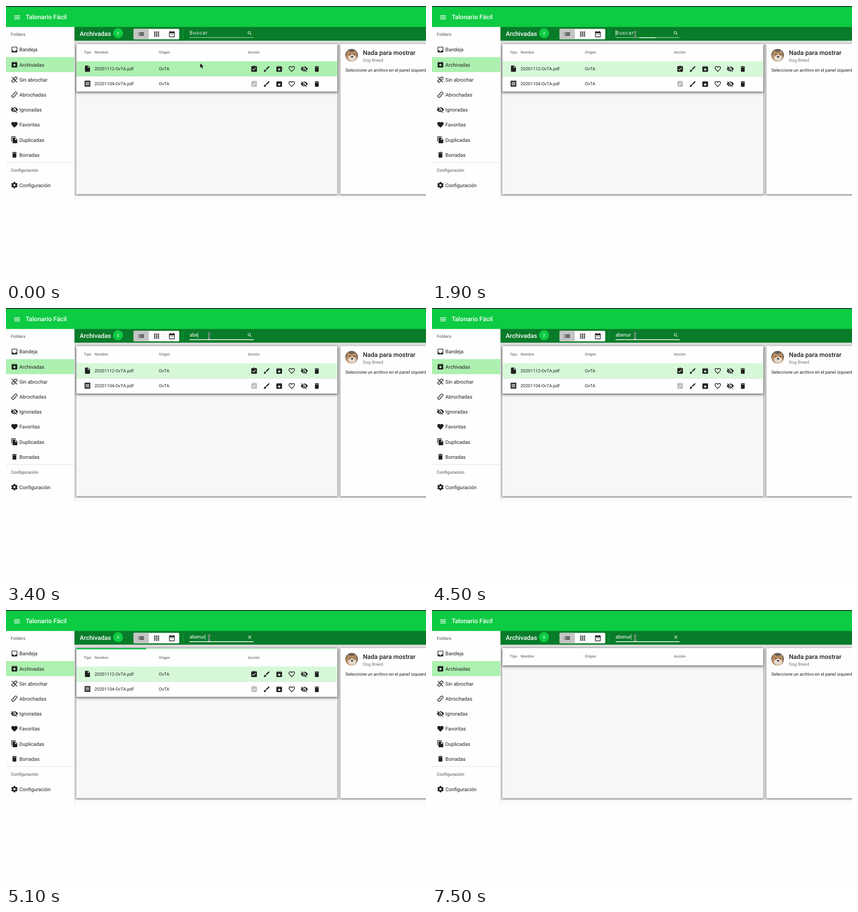
These frames come from a looping animation (926x605 px, 8000 ms). An HTML page:

```html
<!DOCTYPE html>
<html lang="es">
<head>
<meta charset="utf-8">
<title>Bandeja de archivos</title>
<style>
html, body { margin: 0; width: 100%; height: 100%; overflow: hidden; background: #fefefe; }
svg { display: block; width: 926px; height: 605px; font-family: Roboto, sans-serif; text-rendering: geometricPrecision; }
.raised { filter: drop-shadow(0 1px 2px rgba(0,0,0,.5)); }
.table { filter: drop-shadow(0 2px 2px rgba(0,0,0,.5)) drop-shadow(0 2px 3px rgba(0,0,0,.2)); }
</style>
</head>
<body>
<svg id="stage" viewBox="0 0 926 605"></svg>
<script>
const LOOP = 8000, UNIT = 0.692;
const GREEN = '#0dcb42', DARK = '#087c29', INK = '#1f1f1f', MUTED = '#757575', ACTIVE = '#adf0b0';
const stage = document.getElementById('stage');

const BOX = 'M20.5 5.2l-1.4-1.7C18.9 3.2 18.5 3 18 3H6c-.5 0-.9.2-1.2.5L3.5 5.2C3.2 5.6 3 6 3 6.5V19c0 1.1.9 2 2 2h14c1.1 0 2-.9 2-2V6.5c0-.5-.2-.9-.5-1.3z';
const LINK = 'M10 14a4 4 0 0 1 0-5.7l3.5-3.5a4 4 0 0 1 5.7 5.7l-1.5 1.5M14 10a4 4 0 0 1 0 5.7l-3.5 3.5a4 4 0 0 1-5.7-5.7l1.5-1.5';
const ICONS = {
  menu: 'M3 18h18v-2H3zM3 13h18v-2H3zM3 6v2h18V6z',
  inbox: 'M19 3H5c-1.1 0-2 .9-2 2v14c0 1.1.9 2 2 2h14c1.1 0 2-.9 2-2V5c0-1.1-.9-2-2-2zm0 12h-4c0 1.7-1.3 3-3 3s-3-1.3-3-3H5V5h14z',
  archive: BOX + 'M12 17.5L6.5 12H10v-2h4v2h3.5zM5.1 5l.8-1h12l1 1z',
  unarchive: BOX + 'M12 9.5l5.5 5.5H14v2h-4v-2H6.5zM5.1 5l.8-1h12l1 1z',
  hidden: 'M12 7c2.76 0 5 2.24 5 5 0 .65-.13 1.26-.36 1.83l2.92 2.92c1.51-1.26 2.7-2.89 3.43-4.75-1.73-4.39-6-7.5-11-7.5-1.4 0-2.74.25-3.98.7l2.16 2.16C10.74 7.13 11.35 7 12 7zM2 4.27l2.74 2.74C3.08 8.3 1.78 10.02 1 12c1.73 4.39 6 7.5 11 7.5 1.55 0 3.03-.3 4.38-.84L19.73 22 21 20.73 3.27 3zM7.53 9.8l1.55 1.55c-.05.21-.08.43-.08.65 0 1.66 1.34 3 3 3 .22 0 .44-.03.65-.08l1.55 1.55c-.67.33-1.41.53-2.2.53-2.76 0-5-2.24-5-5 0-.79.2-1.53.53-2.2zm4.31-.78l3.15 3.15.02-.16c0-1.66-1.34-3-3-3z',
  heart: 'M12 21.35l-1.45-1.32C5.4 15.36 2 12.28 2 8.5 2 5.42 4.42 3 7.5 3c1.74 0 3.41.81 4.5 2.09C13.09 3.81 14.76 3 16.5 3 19.58 3 22 5.42 22 8.5c0 3.78-3.4 6.86-8.55 11.54z',
  copies: 'M16 1H4c-1.1 0-2 .9-2 2v14h2V3h12zM15 5l6 6v10c0 1.1-.9 2-2 2H8c-1.1 0-2-.9-2-2V7c0-1.1.9-2 2-2zm-1 7h5.5L14 6.5z',
  trash: 'M6 19c0 1.1.9 2 2 2h8c1.1 0 2-.9 2-2V7H6zM19 4h-3.5l-1-1h-5l-1 1H5v2h14z',
  file: 'M6 2c-1.1 0-2 .9-2 2v16c0 1.1.9 2 2 2h12c1.1 0 2-.9 2-2V8l-6-6zm7 7V3.5L18.5 9z',
  receipt: 'M3 22l1.5-1.5L6 22l1.5-1.5L9 22l1.5-1.5L12 22l1.5-1.5L15 22l1.5-1.5L18 22l1.5-1.5L21 22V2l-1.5 1.5L18 2l-1.5 1.5L15 2l-1.5 1.5L12 2l-1.5 1.5L9 2 7.5 3.5 6 2 4.5 3.5 3 2zM18 17H6v-2h12zM18 13H6v-2h12zM18 9H6V7h12z',
  task: 'M19 3h-4.2C14.4 1.8 13.3 1 12 1s-2.4.8-2.8 2H5c-1.1 0-2 .9-2 2v14c0 1.1.9 2 2 2h14c1.1 0 2-.9 2-2V5c0-1.1-.9-2-2-2zm-7 0c.5 0 1 .5 1 1s-.5 1-1 1-1-.5-1-1 .5-1 1-1zm-2 14l-4-4 1.4-1.4 2.6 2.6 6.6-6.6L18 9z',
  brush: 'M7 14c-1.7 0-3 1.3-3 3 0 1.3-1.2 2-2 2 .9 1.2 2.5 2 4 2 2.2 0 4-1.8 4-4 0-1.7-1.3-3-3-3zM20.7 4.6l-1.3-1.3c-.4-.4-1-.4-1.4 0l-9 9L11.75 15l9-9c.4-.4.4-1 0-1.4z',
  list: 'M3 7h2v2H3zM3 11h2v2H3zM3 15h2v2H3zM7 7h14v2H7zM7 11h14v2H7zM7 15h14v2H7z',
  grid: [4, 10, 16].map(y => [4, 10, 16].map(x => `M${x} ${y}h4v4h-4z`).join('')).join(''),
  calendar: 'M19 4h-1V2h-2v2H8V2H6v2H5c-1.1 0-2 .9-2 2v14c0 1.1.9 2 2 2h14c1.1 0 2-.9 2-2V6c0-1.1-.9-2-2-2zm0 16H5V9h14zM7 11h2v2H7zM11 11h2v2h-2zM15 11h2v2h-2z',
  search: 'M15.5 14h-.8l-.3-.3C15.4 12.6 16 11.1 16 9.5a6.5 6.5 0 1 0-6.5 6.5c1.6 0 3.1-.6 4.2-1.6l.3.3v.8l5 5 1.5-1.5zm-6 0a4.5 4.5 0 1 1 0-9 4.5 4.5 0 0 1 0 9z',
  close: 'M19 6.4L17.6 5 12 10.6 6.4 5 5 6.4l5.6 5.6L5 17.6 6.4 19l5.6-5.6 5.6 5.6 1.4-1.4-5.6-5.6z'
};
const STROKED = { link: LINK, unlink: LINK + 'M3.5 3.5l17 17', heartLine: 'M12 20C6 14.7 3 12 3 8.5 3 6 5 4 7.5 4 9.5 4 11 5 12 6.8 13 5 14.500 4 16.500 4 19 4 21 6 21 8.5c0 3.500-3 6.200-9 11.500z' };

const rect = (x, y, w, h, fill, extra = '') => `<rect x="${x}" y="${y}" width="${w}" height="${h}" fill="${fill}" ${extra}/>`;
const text = (x, y, size, content, fill = INK, weight = 400, extra = '') =>
  `<text x="${x}" y="${y}" font-size="${size * UNIT}" font-weight="${weight}" fill="${fill}" ${extra}>${content}</text>`;
function icon(name, cx, cy, fill = INK, scale = UNIT, extra = '') {
  const place = `transform="translate(${cx - 12 * scale} ${cy - 12 * scale}) scale(${scale})" ${extra}`;
  return STROKED[name]
    ? `<path d="${STROKED[name]}" fill="none" stroke="${fill}" stroke-width="2.1" ${place}/>`
    : `<path d="${ICONS[name]}" fill="${fill}" fill-rule="evenodd" ${place}/>`;
}

function sidebar() {
  const folders = [['inbox', 'Bandeja'], ['archive', 'Archivadas'], ['unlink', 'Sin abrochar'], ['link', 'Abrochadas'],
    ['hidden', 'Ignoradas'], ['heart', 'Favoritas'], ['copies', 'Duplicadas'], ['trash', 'Borradas']];
  const item = (name, label, y) => icon(name, 18.6, y) + text(29.6, y + 4.2, 16, label);
  const gear = `<g transform="translate(18.6 395.600)" fill="${INK}">` +
    [0, 60, 120].map(a => `<rect x="-2" y="-7" width="4" height="14" rx=".6" transform="rotate(${a})"/>`).join('') +
    '<circle r="5.200"/><circle r="2.400" fill="#fefefe"/></g>';
  return rect(0, 46, 151, 381, '#fefefe') + rect(0, 112.8, 151, 33.2, ACTIVE) +
    text(10.5, 66.3, 14, 'Folders', MUTED, 500) +
    folders.map(([name, label], i) => item(name, label, 96.2 + i * 33.2)).join('') +
    rect(0, 345, 151, 1, '#e0e0e0') +
    text(10.5, 365.8, 14, 'Configuración', MUTED, 500) + gear + text(29.6, 399.8, 16, 'Configuración') +
    rect(150.5, 46, 1, 381, '#dcdcdc');
}

function toolbar() {
  return rect(151, 46, 775, 30.6, DARK) +
    text(162.5, 66.4, 20, 'Archivadas', '#fff', 500) +
    `<circle cx="247" cy="60" r="11" fill="${GREEN}"/>` +
    text(247, 63, 12, '2', '#fff', 500, 'id="count" text-anchor="middle"') +
    rect(281, 50.5, 101, 23, '#fefefe', 'rx="2.5"') + rect(281, 50.5, 34, 23, '#c4c4c4', 'rx="2.5"') +
    rect(314.5, 50.5, 0.7, 23, '#ddd') + rect(348.3, 50.5, 0.7, 23, '#ddd') +
    icon('list', 298, 62) + icon('grid', 332, 62) + icon('calendar', 365.7, 62) +
    `<path d="M390.500 52v20" stroke="${GREEN}" stroke-dasharray="2 1.500"/>` +
    rect(404.7, 69.3, 141, 0.8, '#fff') + rect(404.7, 69.3, 141, 1.4, '#fff', 'id="focusLine"') +
    text(404.7, 63.4, 16, 'Buscar', '#f2f8f2', 400, 'id="label" letter-spacing="1.050"') +
    text(404.7, 63.4, 16, '', '#fff', 400, 'id="query"') + rect(405, 53.5, 0.8, 12.5, '#fff', 'id="caret"') +
    icon('search', 537.5, 60, '#fff', 0.485, 'id="searchIcon"') + icon('close', 537.5, 60, '#fff', 0.52, 'id="closeIcon"');
}

function row(y, kind, name, taskColor) {
  const actions = ['brush', 'unarchive', 'heartLine', 'hidden', 'trash'];
  return icon(kind, 179.6, y - 0.7) + text(195.3, y + 2.9, 14, name) + text(337, y + 2.9, 14, 'OvTA') +
    icon('task', 547, y, taskColor) + actions.map((a, i) => icon(a, 574.7 + i * 27.65, y)).join('');
}

function content() {
  const headings = [[171.5, 'Tipo'], [195.5, 'Nombre'], [337, 'Origen'], [533.5, 'Acción']];
  return rect(151, 76, 775, 351, '#fafafa') + rect(151, 76, 775, 342, '#dedede') + rect(151, 418, 775, 0.8, '#c8c8c8') +
    rect(155, 84, 575.5, 331.5, '#f8f7f7', 'class="raised"') +
    rect(155, 84, 575.5, 105, '#fefefe', 'id="table" class="table"') +
    `<g id="tableBody">${headings.map(([x, s]) => text(x, 105.2, 12, s, MUTED, 500)).join('')}<g id="rows">` +
    rect(155, 122, 575.5, 33.3, ACTIVE, 'id="firstRow"') + rect(155, 155, 575.5, 0.8, '#d8dcd8') +
    row(139, 'file', '20201112-OvTA.pdf', INK) + row(172.2, 'receipt', '20201104-OvTA.pdf', '#bdbdbd') + '</g></g>' +
    `<g id="progress">${rect(155, 84, 575.5, 2.8, '#c4f0cd')}${rect(155, 84, 0, 2.8, '#12bf4b', 'id="bar"')}</g>` +
    rect(737.3, 84, 220, 331.5, '#fefefe', 'class="raised"') + avatar() +
    text(787, 108, 20, 'Nada para mostrar', INK, 500) + text(787, 123, 14, 'Dog Breed', MUTED) +
    text(748.3, 145.3, 14, 'Seleccione un archivo en el panel izquierdo');
}

function avatar() {
  return '<clipPath id="round"><circle r="14"/></clipPath><g transform="translate(762 108.500)" clip-path="url(#round)">' +
    '<circle r="14" fill="#6b6258"/><path d="M-14 14V5L-8-11-3-7H4L9-11 12 3 10 14z" fill="#b98d62"/>' +
    '<ellipse cx="1" cy="6" rx="9" ry="7" fill="#e3d8cc"/><ellipse cx="1" cy="3.500" rx="2.500" ry="1.800" fill="#332c29"/>' +
    '<circle cx="-4" cy="-1" r="1.200" fill="#332c29"/><circle cx="6" cy="-1" r="1.200" fill="#332c29"/></g>';
}

stage.innerHTML = rect(0, 0, 926, 605, '#fefefe') + content() + sidebar() + toolbar() +
  rect(0, 0, 926, 46.3, GREEN) + rect(0, 0, 926, 2, '#26382e') +
  icon('menu', 24.4, 25, '#fff') + text(43.5, 29, 20, 'Talonario Fácil', '#fff', 500) +
  '<path id="arrow" d="M0 0V11.200L2.600 8.800 4.500 13 6.600 12 4.700 8H8.200z" fill="#111" stroke="#e8f5e8" stroke-width=".6"/>' +
  '<g id="beam" fill="none"><path d="M-2.500-6h5M0-6V6M-2.500 6h5" stroke="#fff" stroke-width="2.400"/><path d="M-2.500-6h5M0-6V6M-2.500 6h5" stroke="#111"/></g>';

const part = Object.fromEntries([...stage.querySelectorAll('[id]')].map(el => [el.id, el]));
const set = (id, name, value) => part[id].setAttribute(name, value);
const show = (id, on) => set(id, 'visibility', on ? 'visible' : 'hidden');

// Each step is [start time, value]; a value holds until the next step.
const QUERY = [[0, ''], [3100, 'a'], [3300, 'ab'], [3400, 'abe'], [3600, 'aben'], [3800, 'abenur']];
const CARET = [[0, 0], [1900, 1], [2500, 0], [3100, 1], [4500, 0], [4800, 1], [5600, 0], [6400, 1], [6800, 0], [7500, 1]];
const POINTER = [[0, [428, 126]], [700, [444, 87]], [900, [447, 74]], [1000, [448, 64]], [1100, [448, 63]], [2500, [447.8, 61.7]]];
const BAR = [[0, 0], [4900, 14], [5000, 78], [5100, 154]];
const at = (steps, t) => steps.filter(s => s[0] <= t).pop()[1];
const ramp = (t, from, to) => Math.min(1, Math.max(0, (t - from) / (to - from)));

function draw(t) {
  const loading = t >= 4800 && t < 5400, empty = t >= 5400, typing = t >= 1000;
  const shift = loading ? 2.8 : 0;
  const place = `translate(${at(POINTER, t).join(' ')})`;
  set('arrow', 'transform', place);
  set('beam', 'transform', place);
  show('arrow', !typing);
  show('beam', typing);

  set('firstRow', 'fill', t < 600 ? ACTIVE : '#d6f8d8');
  set('label', 'opacity', 1 - ramp(t, 1900, 2300));
  set('focusLine', 'transform', `translate(475.200 0) scale(${ramp(t, 1800, 2200)} 1) translate(-475.200 0)`);
  const query = at(QUERY, t);
  if (part.query.textContent !== query) part.query.textContent = query;
  set('caret', 'x', 404.7 + (query ? part.query.getComputedTextLength() : 0));
  show('caret', at(CARET, t));
  show('searchIcon', t < 4800);
  show('closeIcon', t >= 4800);

  show('progress', loading);
  set('bar', 'width', at(BAR, t));
  set('tableBody', 'transform', `translate(0 ${shift})`);
  set('table', 'height', empty ? 38.5 : 105 + shift);
  show('rows', !empty);
  part.count.textContent = empty ? '0' : '2';
}

const start = performance.now();
function tick() {
  const t = (performance.now() - start) % LOOP;
  draw(Math.floor(t / 100) * 100);
  requestAnimationFrame(tick);
}
tick();
</script>
</body>
</html>
```
